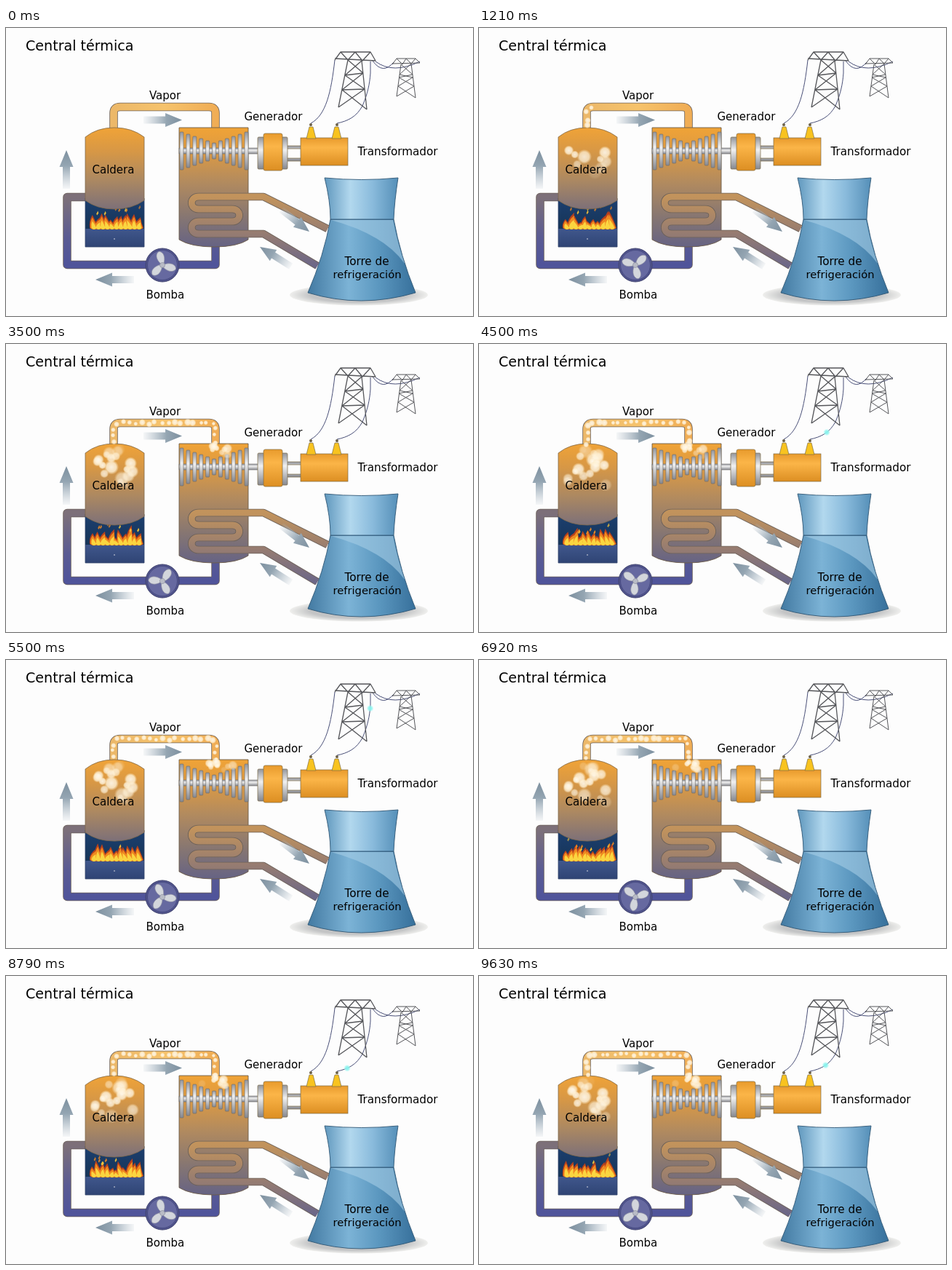
An HTML page for the animation above (9680 ms loop, 642 by 396 pixels).

```html
<!DOCTYPE html>
<html lang="es">
<head>
<meta charset="utf-8">
<title>Central térmica</title>
<style>
html, body { margin: 0; height: 100%; overflow: hidden; background: #fdfdfd; }
svg { display: block; font: 15px "DejaVu Sans", sans-serif; }
.tube { fill: none; stroke-linejoin: round; }
.edge { stroke: #6b6058; stroke-width: 11.5; }
.core { stroke-width: 9.8; }
.slim .edge { stroke-width: 10.6; }
.slim .core { stroke-width: 8.8; }
.line { fill: none; stroke: #4a5078; stroke-width: 1; }
.lattice { fill: none; stroke: #55565a; stroke-width: 1.3; stroke-linejoin: round; }
</style>
</head>
<body>
<svg width="642" height="396" viewBox="0 0 642 396">
<defs>
  <linearGradient id="tank" x2="0" y2="1">
    <stop stop-color="#f0a336"/><stop offset=".2" stop-color="#dc9a44"/>
    <stop offset=".45" stop-color="#b38b5e"/><stop offset=".75" stop-color="#867672"/>
    <stop offset="1" stop-color="#666384"/>
  </linearGradient>
  <linearGradient id="boiler" x2="0" y2="1">
    <stop stop-color="#f0a337"/><stop offset=".3" stop-color="#d69746"/>
    <stop offset=".65" stop-color="#ab8862"/><stop offset="1" stop-color="#7d7078"/>
  </linearGradient>
  <linearGradient id="chamber" x2="0" y2="1">
    <stop stop-color="#1c3f70"/><stop offset=".62" stop-color="#163558"/>
    <stop offset=".63" stop-color="#40578c"/><stop offset="1" stop-color="#2f4474"/>
  </linearGradient>
  <linearGradient id="steam"><stop stop-color="#ecb869"/><stop offset=".5" stop-color="#f6c36c"/><stop offset="1" stop-color="#f0ad55"/></linearGradient>
  <linearGradient id="coilFill" x2="0" y2="1"><stop stop-color="#c2935c"/><stop offset=".55" stop-color="#947b72"/><stop offset="1" stop-color="#6c6788"/></linearGradient>
  <linearGradient id="feedFill" x2="0" y2="1"><stop stop-color="#7d7079"/><stop offset=".6" stop-color="#5a5b93"/><stop offset="1" stop-color="#50549a"/></linearGradient>
  <linearGradient id="metal" x2="0" y2="1">
    <stop stop-color="#93959c"/><stop offset=".4" stop-color="#f0f0f0"/><stop offset="1" stop-color="#85878e"/>
  </linearGradient>
  <linearGradient id="orange" x2="0" y2="1">
    <stop stop-color="#e89a2c"/><stop offset=".35" stop-color="#fbb548"/><stop offset="1" stop-color="#dc8e22"/>
  </linearGradient>
  <linearGradient id="towerTop">
    <stop stop-color="#5f97bd"/><stop offset=".35" stop-color="#b2d8ee"/>
    <stop offset=".65" stop-color="#8abbdc"/><stop offset="1" stop-color="#558fb8"/>
  </linearGradient>
  <linearGradient id="towerBase">
    <stop stop-color="#437aa2"/><stop offset=".38" stop-color="#7cb3d6"/>
    <stop offset=".65" stop-color="#5c98c0"/><stop offset="1" stop-color="#37709b"/>
  </linearGradient>
  <radialGradient id="ground"><stop offset=".7" stop-color="#c3c4c5"/><stop offset="1" stop-color="#efefed"/></radialGradient>
  <linearGradient id="fade"><stop stop-color="#aab8c4" stop-opacity=".1"/><stop offset=".6" stop-color="#94a5b2"/><stop offset="1" stop-color="#7d909f"/></linearGradient>
  <radialGradient id="puff"><stop stop-color="#fffaf0"/><stop offset=".65" stop-color="#fff2d8" stop-opacity=".9"/><stop offset="1" stop-color="#ffe8bd" stop-opacity="0"/></radialGradient>
  <radialGradient id="glow"><stop stop-color="#7ff6ee"/><stop offset=".5" stop-color="#8ff2ee" stop-opacity=".85"/><stop offset="1" stop-color="#a8fff8" stop-opacity="0"/></radialGradient>
  <path id="arrow" d="M-53-5H-23V-9.500L0 0L-23 9.500V5H-53Z" fill="url(#fade)"/>
  <path id="vapor" d="M148 142V117Q148 108.500 157 108.500H279Q288 108.500 288 117V138"/>
  <path id="feed" d="M110 232.500H84V325.500H288V298"/>
  <path id="coil" d="M442 276L354 232H265C252 232 252 249 265 249H311C324 249 324 266 311 266H265C252 266 252 283 265 283H354L428 327"/>
  <path id="current" d="M455 131C470 128 482 122 490 107C497 91 500 77 501 62C501 46 525 64 569 45"/>
  <path id="blade" d="M-2-2C-9-9-8-17-3-19C4-18 5-9 2-2Z" fill="#d3d6dc" stroke="#8b8da0" stroke-width=".6"/>
</defs>

<!-- Cooling tower -->
<ellipse cx="485" cy="367" rx="95" ry="14.500" fill="url(#ground)"/>
<g stroke="#2f5674" stroke-width=".9">
  <path d="M446 263Q437 313 415 364Q488 386 563 364Q542 313 533 263Z" fill="url(#towerBase)"/>
  <path d="M438 206Q489 211 539 206Q534 238 533 263H446Q446 238 438 206Z" fill="url(#towerTop)"/>
</g>
<path d="M447 264H532Q538 295 548 324Q520 284 447 264Z" fill="#a5cde6" opacity=".6"/>

<!-- Piping -->
<g class="tube">
  <use href="#feed" class="edge"/><use href="#feed" class="core" stroke="url(#feedFill)"/>
  <use href="#vapor" class="edge"/><use href="#vapor" class="core" stroke="url(#steam)"/>
</g>

<!-- Boiler -->
<path d="M109 234H190V301H109Z" fill="url(#chamber)" stroke="#33466a" stroke-width=".8"/>
<g id="flames"></g>
<circle cx="149" cy="290" r=".8" fill="#e8e8ec"/>
<path d="M109 150Q125 137 149 137T190 150V237Q173 249 149 249T109 237Z" fill="url(#boiler)" stroke="#806a4c" stroke-width=".8"/>

<!-- Turbine and condenser -->
<path d="M238 137H333V291Q318 301 286 301T238 291Z" fill="url(#tank)" stroke="#6d5c48" stroke-width=".9"/>
<path d="M238 165H348V173H238Z" fill="url(#metal)" stroke="#6f6c6b" stroke-width=".6"/>
<g id="discs" fill="url(#metal)" stroke="#6d6963" stroke-width=".6"></g>
<g class="tube slim"><use href="#coil" class="edge"/><use href="#coil" class="core" stroke="url(#coilFill)"/></g>

<!-- Generator and transformer -->
<g stroke="#7d6a45" stroke-width=".7">
  <g fill="url(#metal)">
    <path d="M386 162H406V166H386ZM386 179H406V183H386Z"/>
    <rect x="346" y="150" width="9" height="44" rx="1.500"/>
    <rect x="378" y="150" width="9" height="44" rx="1.500"/>
  </g>
  <rect x="354" y="145" width="26" height="51" rx="2.500" fill="url(#orange)"/>
  <rect x="405" y="151" width="65" height="38" fill="url(#orange)"/>
  <path d="M413 152L417 136H422L426 152ZM448 152L452 136H457L461 152Z" fill="#f8c31f"/>
</g>
<circle cx="419" cy="133" r="2" fill="#6c6148"/><circle cx="455" cy="133" r="2" fill="#6c6148"/>

<!-- Power line -->
<path class="line" d="M419 131C440 120 447 88 452 44M455 131C470 128 482 122 490 107C497 91 500 77 501 62V46M504 45Q518 65 533 47M508 46Q532 64 569 46"/>
<path class="lattice" d="M452 44L460 33L501 33L508 45L452 42M460 33L470 44L480 33L490 45L501 33M470 44L457 109M489 45L496 112M470 44L491 62L466 65L493 84L462 85L496 112M489 45L466 65L491 62L462 85L493 84L457 109"/>
<path class="lattice" style="stroke-width:1" d="M531 50L537 42L563 42L569 48L531 49M537 42L545 50L550 42L557 49L563 42M543 50L537 94M557 49L563 96M543 50L559 64L540 68L561 80L537 94M557 49L541 64L559 68L539 80L563 96"/>

<!-- Pump -->
<circle cx="215" cy="326" r="23" fill="#50538c" stroke="#41446f"/>
<circle cx="215" cy="326" r="20.5" fill="#6669a0" stroke="#484c82"/>
<g id="fan">
  <use href="#blade"/><use href="#blade" transform="rotate(120)"/><use href="#blade" transform="rotate(240)"/>
  <circle r="3.5" fill="#b9bcc6" stroke="#85889a" stroke-width=".6"/>
</g>

<use href="#arrow" transform="translate(242 126.500)"/>
<use href="#arrow" transform="translate(83 168) rotate(-90)"/>
<use href="#arrow" transform="translate(123 346) rotate(180)"/>
<use href="#arrow" transform="translate(417 280) rotate(38) scale(.92)"/>
<use href="#arrow" transform="translate(349 301) rotate(212) scale(.95)"/>

<g id="puffs" fill="url(#puff)"></g>
<circle id="spark" r="5" fill="url(#glow)"/>

<text x="27" y="30.500" font-size="19.1">Central térmica</text>
<text x="197" y="98">Vapor</text>
<text x="327.500" y="127">Generador</text>
<text x="483.500" y="175" font-size="15.2">Transformador</text>
<text x="118.500" y="200">Caldera</text>
<text x="192.500" y="372">Bomba</text>
<text x="496" y="326" text-anchor="middle" font-size="15.2">Torre de</text>
<text x="496.500" y="343.500" text-anchor="middle" font-size="14.700">refrigeración</text>
</svg>

<script>
const LOOP = 9.68, FRAME = 1 / 24;
const $ = id => document.getElementById(id);
const rand = n => { const v = Math.sin(n * 127.1 + 11.7) * 43758.5453; return v - Math.floor(v); };
const set = (el, attrs) => { for (const k in attrs) el.setAttribute(k, attrs[k]); return el; };
const add = (parent, tag, attrs = {}) =>
  parent.appendChild(set(document.createElementNS('http://www.w3.org/2000/svg', tag), attrs));
const make = (count, fn) => Array.from({ length: count }, (_, i) => fn(i));
const makePuffs = count => make(count, () => add($('puffs'), 'circle'));

for (let i = -5; i <= 5; i++) {
  const half = 11 + Math.abs(i) * 3;
  add($('discs'), 'rect', { x: 283.5 + i * 8.9, y: 169 - half, width: 5, height: half * 2, rx: 1 });
}

const layers = [['#b8401c', 1], ['#ef8a20', .82], ['#fbd640', .55]]
  .map(([fill, scale]) => ({ scale, el: add($('flames'), 'path', { fill }) }));
const embers = make(8, i => add($('flames'), 'path', { fill: i % 2 ? '#f7c53a' : '#ee8a22' }));
const boilerPuffs = makePuffs(18), pipePuffs = makePuffs(22), turbinePuffs = makePuffs(10);
const wire = $('current'), pipe = $('vapor');
const wireLength = wire.getTotalLength(), pipeLength = pipe.getTotalLength();

function tongue(i, step, scale) {
  const x = 121 + i * 6.2, seed = i * 17 + step * 3.7;
  const h = (9 + 8 * rand(i + 40) + 11 * rand(seed)) * scale;
  const w = 6 * scale, lean = (rand(seed + 5) - .5) * 9;
  return `M${x - w} 275Q${x - w * 1.2} ${275 - h * .5} ${x + lean} ${276 - h}` +
    `Q${x + w * .5} ${275 - h * .4} ${x + w} 275Q${x} 279 ${x - w} 275Z`;
}

function drawFire(t) {
  const step = Math.floor(t / FRAME / 2);
  for (const { el, scale } of layers)
    set(el, { d: make(11, i => tongue(i, step, scale)).join('') });
  embers.forEach((el, i) => {
    const life = t * 1.7 + rand(i + 70), u = life % 1;
    const x = 119 + 64 * rand(Math.floor(life) * 9 + i), y = 262 - 24 * u;
    set(el, { d: `M${x} ${y}l2-4l1 3l-2 3Z`, opacity: 1 - u * u });
  });
}

// Puffs are released one after another from `start`, then each repeats every `period`.
function drawPuffs(puffs, t, start, period, place) {
  puffs.forEach((el, i) => {
    const life = (t - start) / period - i / puffs.length;
    const attrs = place(life - Math.floor(life), i);
    set(el, life < 0 ? { opacity: 0 } : attrs);
  });
}

function drawSteam(t) {
  drawPuffs(boilerPuffs, t, .3, 2, (u, i) => {
    const x = 117 + 58 * rand(i + 3);
    return {
      cx: x + (148 - x) * u ** 3 * .7, cy: 200 - 55 * u ** .7, r: 4 + 6.5 * rand(i + 21),
      opacity: .9 * Math.sqrt(Math.sin(Math.PI * u))
    };
  });
  drawPuffs(pipePuffs, t, .9, 1.75, (u, i) => {
    const p = pipe.getPointAtLength(u * pipeLength);
    return {
      cx: p.x + (rand(i + 8) - .5) * 4, cy: p.y + (rand(i + 55) - .5) * 4,
      r: 2.5 + 2.8 * rand(i + 31), opacity: .9
    };
  });
  drawPuffs(turbinePuffs, t, 2.6, .9, (u, i) => ({
    cx: 288 + (rand(i + 90) - .5) * 68 * u, cy: 137 + 17 * Math.sqrt(u) * (.4 + .6 * rand(i + 12)),
    r: 4 + 4 * rand(i + 61), opacity: .9 * (1 - u ** 3)
  }));
}

function drawSpark(t) {
  const first = 3.585, dist = (t - first) % .855 * 420;
  const visible = t >= first && dist < wireLength;
  const p = wire.getPointAtLength(visible ? dist : 0);
  set($('spark'), { cx: p.x, cy: p.y, opacity: visible ? 1 : 0 });
}

function draw() {
  const now = performance.now() / 1000 % LOOP;
  const t = now < .13 ? 0 : Math.floor(now / FRAME) * FRAME;
  set($('fan'), { transform: `translate(215 326) rotate(${t * 151 - 5})` });
  drawFire(t);
  drawSteam(t);
  drawSpark(t);
  requestAnimationFrame(draw);
}
draw();
</script>
</body>
</html>
```
